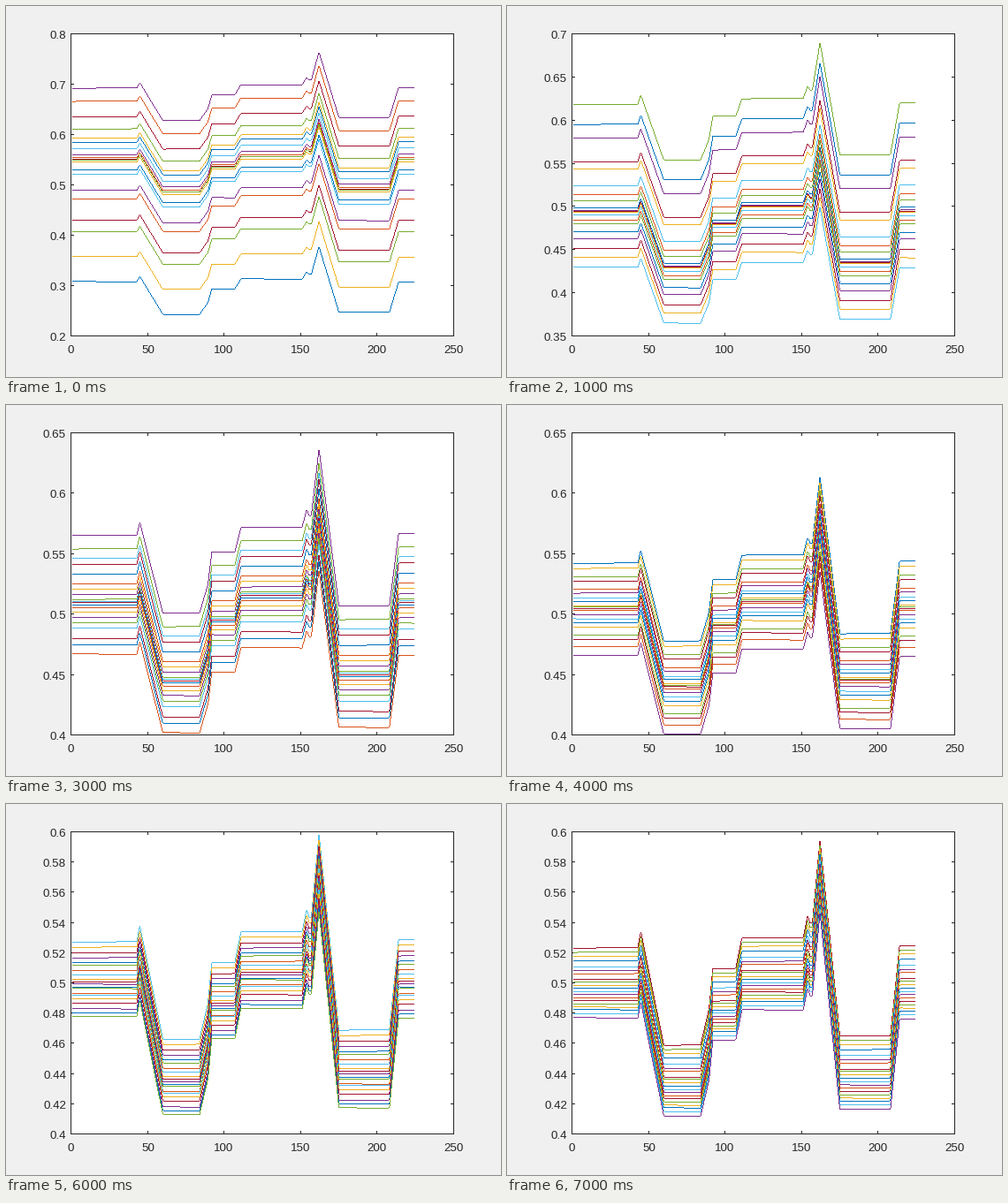
A matplotlib script for the animation above (8 s loop, 560 px wide and 420 px high).

```python
import numpy as np
import matplotlib.pyplot as plt
from matplotlib.animation import FuncAnimation
from matplotlib.patches import Rectangle

W, H = 560, 420
LEFT, RIGHT, TOP, BOTTOM = 73, 506, 31, 373
X_MAX = 250
TICK = 3
CURVES = 20
INK = "#262626"
PX = 0.72  # one pixel in points at 100 dpi
COLORS = ["#0072BD", "#D95319", "#EDB120", "#7E2F8E",
          "#77AC30", "#4DBEEE", "#A2142F"]

# Corners of the profile every curve follows: position, offset from its level
CORNERS = np.array([
    (1, 0), (43, 0), (45, .0105), (60, -.0647), (84, -.0647),
    (89.5, -.041), (92, -.0142), (107, -.0142), (111, .006), (151, .006),
    (154, .0205), (155.5, .0155), (157, .0155), (162, .0705),
    (175, -.0595), (208, -.0595), (214, .0003), (224, .0003)])
T, OFFSET = CORNERS.T

# Per step: lowest, middle and highest level, top colour, colour stride
STEPS = [(.308, .550, .692, 3, 5), (.430, .495, .618, 4, 3),
         (.4355, .490, .5655, 1, 5), (.467, .510, .565, 3, 1),
         (.466, .505, .542, 0, 2), (.4685, .500, .521, 4, 6),
         (.478, .500, .527, 5, 4), (.477, .497, .523, 6, 5)]

fig = plt.figure(figsize=(W / 100, H / 100), dpi=100, facecolor="#F0F0F0")
ax = fig.add_axes([0, 0, 1, 1])


def make_curves(k):
    """Corner values of all curves, from the highest to the lowest."""
    low, mid, high, _, _ = STEPS[k]
    u = np.linspace(1, -1, CURVES)
    u[1:-1] += np.random.default_rng(k).uniform(-.03, .03, CURVES - 2)
    reach = np.where(u > 0, high - mid, low - mid)
    # the bundle is dense in the middle at first, then evens out
    level = mid + reach * np.abs(u) ** (2 - k / 8)
    drift = .0015 * np.outer(u, (T - 1) / (T[-1] - 1))
    return level[:, None] + OFFSET + drift


def axis_limits(values):
    low, high = values.min(), values.max()
    span = high - low
    step = .1 if span > .4 else .05 if span > .2 else .02
    return np.floor(low / step) * step, np.ceil(high / step) * step, step


def to_x(v):
    return LEFT + .5 + v / X_MAX * (RIGHT - LEFT)


def to_y(v, low, high):
    return BOTTOM + .5 - (v - low) / (high - low) * (BOTTOM - TOP)


def column(x, y0, y1, color=INK):
    """Pixel columns x, filled from row y0 up to but not including y1."""
    ax.vlines(np.asarray(x) + .5, y0, y1, colors=color, lw=PX, snap=False)


def row(y, x0, x1):
    ax.hlines(y + .5, x0, x1, colors=INK, lw=PX, snap=False)


def label(x, y, value, align):
    ax.text(x, y, f"{value:g}", color=INK, family="Liberation Sans",
            size=9.6, ha=align, va="baseline")


def draw_axes(low, high, step):
    ax.add_patch(Rectangle((LEFT, TOP), RIGHT - LEFT + 1, BOTTOM - TOP + 1,
                           fc="white", ec="none"))
    for y in (TOP, BOTTOM):
        row(y, LEFT, RIGHT + 1)
    for x in (LEFT, RIGHT):
        column(x, TOP, BOTTOM + 1)
    for v in range(0, X_MAX + 1, 50):
        x = np.floor(to_x(v))
        column(x, BOTTOM - TICK, BOTTOM)
        column(x, TOP + 1, TOP + 1 + TICK)
        label(x + .5, 393, v, "center")
    for i in range(round((high - low) / step) + 1):
        v = round(low + i * step, 3)
        y = np.floor(to_y(v, low, high) + 1e-6)
        row(y, LEFT + 1, LEFT + 1 + TICK)
        row(y, RIGHT - TICK, RIGHT)
        label(68, y + 6, v, "right")


def draw_curve(x, y, color):
    """Crisp line one pixel thick: a short vertical run in each column."""
    cols = np.arange(np.ceil(x[0] - .5), np.floor(x[-1]) + 1)
    left, mid, right = (np.interp(cols + d, x, y) for d in (0, .5, 1))
    ends = np.sort([left, mid, right], axis=0)
    top, bottom = np.ceil(ends[0] - .5), np.ceil(ends[2] - .5)
    top = np.where(top == bottom, np.floor(mid), top)
    column(cols, top, np.maximum(bottom, top + 1), color)


def update(k):
    ax.clear()
    ax.set(xlim=(0, W), ylim=(H, 0))
    ax.axis("off")
    curves = make_curves(k)
    low, high, step = axis_limits(curves)
    draw_axes(low, high, step)
    first, stride = STEPS[k][3:]
    for i, values in enumerate(curves):
        draw_curve(to_x(T), to_y(values, low, high),
                   COLORS[(first + i * stride) % len(COLORS)])
    ax.set(xlim=(0, W), ylim=(H, 0))
    return ax.get_children()


anim = FuncAnimation(fig, update, frames=len(STEPS), interval=1000,
                     repeat=True, repeat_delay=0, blit=False)
plt.show()
```
